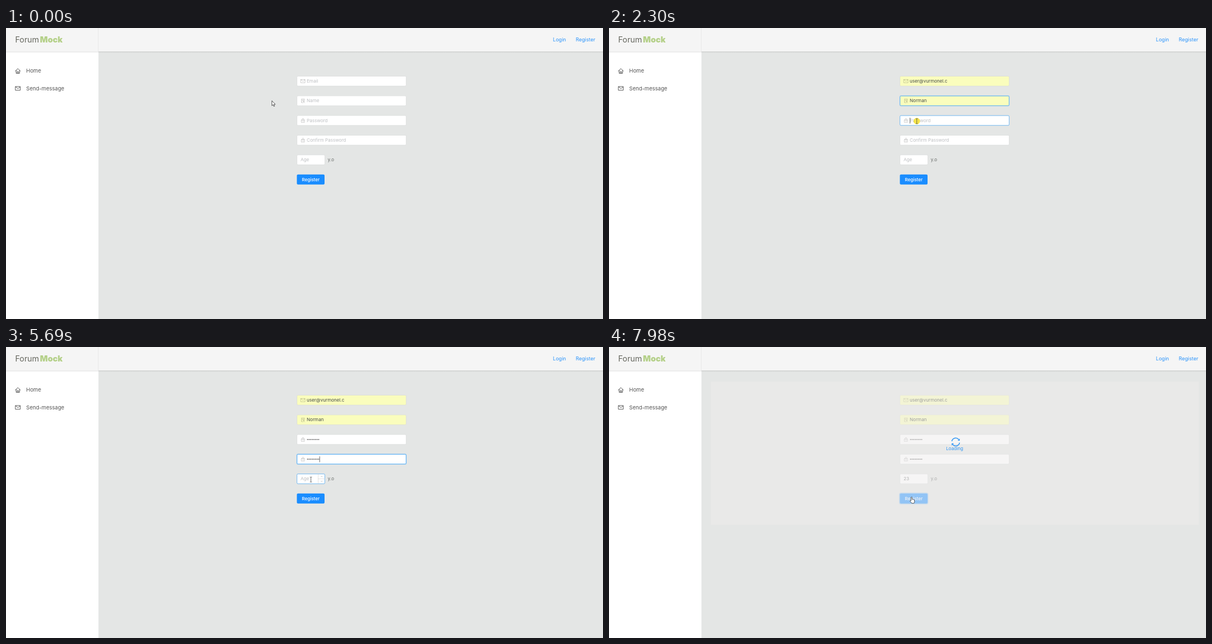
These frames come from a looping animation (1072x522 px, 8000 ms). An HTML page:

```html
<!DOCTYPE html>
<html lang="en">
<head>
<meta charset="utf-8">
<title>Registration form</title>
<style>
  html, body { margin: 0; width: 100%; height: 100%; overflow: hidden; background: #e4e6e5; }
  svg { display: block; width: 1072px; height: 522px; font: 8.1px Inter, "Open Sans", sans-serif; }
  .line { fill: none; stroke-width: .7; stroke-linejoin: round; stroke-linecap: round; }
  .muted { stroke: rgba(0,0,0,.27); }
  .dark { stroke: #4a4a4a; stroke-width: .9; }
  .hint { fill: #bdbfc2; }
  .value { fill: #454a48; }
  .typed { fill: #707372; }
  .nav { font-size: 9.55px; fill: #555; }
  .link { font-size: 9.1px; fill: #2f96fb; }
</style>
</head>
<body>
<svg id="stage" viewBox="0 0 1072 522" xmlns="http://www.w3.org/2000/svg">
  <defs>
    <linearGradient id="shade" x2="0" y2="1">
      <stop stop-color="#000" stop-opacity=".1"/>
      <stop offset="1" stop-color="#000" stop-opacity="0"/>
    </linearGradient>
  </defs>
  <rect width="1072" height="522" fill="#e4e6e5"/>
  <rect width="166" height="522" fill="#fff"/>
  <rect width="1072" height="42" fill="#f5f5f5"/>
  <rect y="42" width="166" height="3" fill="url(#shade)"/>
  <rect x="166" y="42" width="906" height="3" fill="url(#shade)"/>
  <rect x="165.4" width=".7" height="42" fill="#e2e3e3"/>
  <text x="16.5" y="25.8" font-size="14.3" fill="#66675f">Forum</text>
  <text x="61" y="25.8" font-size="14.6" font-weight="900" fill="#b4d088">Mock</text>
  <text class="link" x="982" y="24.3">Login</text>
  <text class="link" x="1023" y="24.3">Register</text>
  <path class="line dark" d="M16.8 77.3 21.3 72.8 25.8 77.3M18.2 76V81.3H24.4V76M20.2 81.3V78.2H22.4V81.3"/>
  <text class="nav" x="36.3" y="80.4">Home</text>
  <path class="line dark" d="M17.2 105H25.6V111.7H17.2ZM17.4 105.6 21.4 108.8 25.4 105.6"/>
  <text class="nav" x="36.3" y="111.8">Send-message</text>
  <g id="form"></g>
  <g id="mask">
    <rect x="183" y="62" width="876" height="257" fill="#eeecec" opacity=".52"/>
  </g>
  <g id="loading">
    <g id="spin">
      <path d="M-7 -1.2A7.1 7.1 0 0 1 5.3 -4.7M7 1.2A7.1 7.1 0 0 1 -5.3 4.7" fill="none" stroke="#2f96f5" stroke-width="1.5"/>
      <path d="M7.2 -6.3V-2.4H3.3ZM-7.2 6.3V2.4H-3.3Z" fill="#2f96f5"/>
    </g>
    <text x="620.6" y="185.2" text-anchor="middle" fill="#2f96f5">Loading</text>
  </g>
  <circle id="click" r="5.8" fill="#f4e22e"/>
  <g id="cursor">
    <path id="arrow" d="M.5 .5V9.3L2.5 7.5 4 10.7 5.3 10.1 3.9 7H6.6Z" fill="#fff" stroke="#333" stroke-width=".8"/>
    <path id="beam" d="M-1.8 -4.4H-.5L0 -4 .5 -4.4H1.8M0 -4V4.2M-1.8 4.6H-.5L0 4.2 .5 4.6H1.8" fill="none" stroke="#444" stroke-width=".75"/>
    <path id="hand" d="M-1 5.5V-.7Q0 -1.9 1 -.7V3Q2 2.3 2.7 3.3 3.7 2.7 4.2 3.7 5.2 3.3 5.3 4.5V7.3Q5 9 4.2 10H.4Q-.6 8.5 -2.9 6Q-2.6 4.4 -1 5.5Z" fill="#fff" stroke="#333" stroke-width=".8"/>
  </g>
</svg>
<script>
const LOOP = 8000, LEFT = 522.5, TOP = 95.3, STEP = 35.3, HEIGHT = 17.6;
const BLUE = '#4aabfa', RED = '#f0424d', DOT = 2.85;
const $ = id => document.getElementById(id);

function add(parent, tag, attrs, text) {
  const node = document.createElementNS('http://www.w3.org/2000/svg', tag);
  for (const key in attrs) node.setAttribute(key, attrs[key]);
  if (text) node.textContent = text;
  return parent.appendChild(node);
}
const set = (node, key, value) => node.setAttribute(key, value);
const fade = (node, opacity) => set(node, 'opacity', opacity);
const ramp = (t, from, to) => Math.min(1, Math.max(0, (t - from) / (to - from)));
const pulse = (t, from, to) => ramp(t, from, from + 180) * (1 - ramp(t, to, to + 200));
const countPast = (t, times) => times.filter(time => time <= t).length;

const lock = 'M530.6 -.7H536V3.3H530.6ZM531.7 -.7V-1.8A1.6 1.7 0 0 1 534.9 -1.8V-.7M533.3 .9V1.7';
const fields = [
  { hint: 'Email', value: 'user@vurmonel.c', focus: [340, 1340], keys: [900],
    icon: 'M529.6 -2.9H537V2.9H529.6ZM529.8 -2.4 533.3 .5 536.8 -2.4' },
  { hint: 'Name', value: 'Norman', focus: [1340, 2280], keys: [1900],
    icon: 'M536 -.5V-3.2H530.5V3.3H533M532 -1.4H534.6M532 .2H533.4M533.6 3.4Q534.9 1 536.3 3.4M534.1 .9A.8 .8 0 1 1 535.7 .9A.8 .8 0 1 1 534.1 .9' },
  { hint: 'Password', secret: true, focus: [2280, 3400], icon: lock,
    keys: [2650, 2850, 2930, 3000, 3060, 3120, 3180, 3240] },
  { hint: 'Confirm Password', secret: true, focus: [3400, 5770], icon: lock, error: [3660, 5250],
    keys: [3660, 3800, 3940, 4170, 4440, 4620, 4920, 5250] },
  { hint: 'Age', value: '23', typed: true, focus: [5770, 7620], keys: [6970, 7130], width: 50 }
];

// Time, x, y of the pointer; moves between entries are eased.
const path = [
  [0, 477, 130], [90, 477, 130], [290, 545, 96], [840, 545, 96], [990, 547, 162],
  [1060, 547, 162], [1320, 547, 132], [1820, 547, 132], [1960, 548, 148], [2220, 552.7, 167],
  [3050, 552.7, 167], [3270, 559.5, 190], [3390, 562.8, 200], [5300, 562.8, 200],
  [5740, 547, 239], [6070, 547, 239], [6190, 544, 245.2], [6400, 546, 243],
  [7180, 546, 243], [7520, 543.3, 270.3], [LOOP, 543.3, 270.3]
];
const clicks = [340, 1340, 2280, 3400, 5770, 6270, 7620];

const form = $('form');
fields.forEach((field, i) => {
  const y = TOP + STEP * i;
  field.y = y;
  field.width = field.width || 196;
  const g = add(form, 'g', { transform: `translate(0 ${y})` });
  const box = { x: LEFT, y: -HEIGHT / 2, width: field.width, height: HEIGHT, rx: 1.8 };
  const outline = color => {
    const ring = add(g, 'g', { opacity: 0 });
    add(ring, 'rect', { ...box, fill: 'none', stroke: color, 'stroke-width': 2.2, 'stroke-opacity': .22 });
    add(ring, 'rect', { ...box, fill: 'none', stroke: color, 'stroke-width': .8 });
    return ring;
  };
  field.box = add(g, 'rect', { ...box, fill: '#fff', stroke: '#d6d7d7', 'stroke-width': .6 });
  field.hover = add(g, 'rect', { ...box, fill: 'none', stroke: BLUE, 'stroke-width': .7 });
  field.ring = outline(BLUE);
  if (field.error) field.alarm = outline(RED);
  if (field.icon) add(g, 'path', { class: 'line muted', d: field.icon });
  field.x = field.icon ? 540 : 529;
  field.label = add(g, 'text', { class: 'hint', x: field.x, y: 2.6 }, field.hint);
  if (field.secret) {
    field.dots = field.keys.map((_, n) =>
      add(g, 'circle', { cx: field.x + 1.5 + DOT * n, cy: 0, r: .95, fill: '#555' }));
  } else {
    field.text = add(g, 'text', { class: field.typed ? 'typed' : 'value', x: field.x, y: 2.6 }, field.value);
  }
  field.caret = add(g, 'rect', { y: -5, width: .8, height: 10.5, fill: '#444' });
});

const age = fields[4];
const arrows = add(form, 'g', { transform: `translate(560.6 ${age.y})` });
add(arrows, 'path', { class: 'line', stroke: '#d9d9d9', d: 'M0 -8.3V8.3M0 0H11.8' });
add(arrows, 'path', { class: 'line', stroke: '#aaa', d: 'M5 -3.6 6.2 -4.8 7.4 -3.6M5 3.8 6.2 5 7.4 3.8' });
add(form, 'text', { x: 577.7, y: age.y + 2.6, fill: '#676a68' }, 'y.o');

const button = { x: 522.3, y: 262.7, width: 49.7, height: 18, rx: 2 };
const wave = add(form, 'rect', { ...button, fill: 'none', stroke: '#1890ff', 'stroke-width': 3, 'stroke-opacity': .5 });
const face = add(form, 'rect', { ...button, fill: '#1a8dff' });
add(form, 'text', { x: 547.2, y: 274.6, 'text-anchor': 'middle', 'font-weight': 500, fill: '#fff' }, 'Register');
const invalid = add(form, 'text', { x: 522.3, y: 113 }, 'invalid email');
const mismatch = add(form, 'text', { x: 522.3, y: 219.2, 'font-size': 8.3, fill: RED }, 'Two passwords not match!');

function pointerAt(t) {
  const i = path.findIndex(point => point[0] > t);
  const [t0, x0, y0] = path[i - 1], [t1, x1, y1] = path[i];
  const p = ramp(t, t0, t1), eased = p * p * (3 - 2 * p);
  return { x: x0 + (x1 - x0) * eased, y: y0 + (y1 - y0) * eased };
}

const inside = (p, y, width) =>
  p.x >= LEFT && p.x <= LEFT + width && Math.abs(p.y - y) <= HEIGHT / 2;

function drawField(field, t, pointer) {
  const count = countPast(t, field.keys);
  const [start, end] = field.focus;
  const over = inside(pointer, field.y, field.width);
  const wrong = field.error ? pulse(t, ...field.error) : 0;
  const focus = pulse(t, start, end) * (1 - wrong);
  fade(field.hover, over ? (1 - wrong) * (1 - focus) : 0);
  fade(field.ring, focus);
  if (field.alarm) fade(field.alarm, wrong);
  fade(field.label, count ? 0 : 1);

  let caretX = field.x;
  if (field.secret) {
    field.dots.forEach((dot, n) => fade(dot, n < count ? 1 : 0));
    caretX += DOT * count;
  } else {
    field.text.textContent = field.typed ? field.value.slice(0, count) : count ? field.value : '';
    if (count) caretX += field.text.getComputedTextLength();
    if (!field.typed) set(field.box, 'fill', count ? '#fafdbd' : '#fff');
  }
  const last = Math.max(start, ...[...field.keys, ...clicks].filter(time => time <= t));
  const shown = t >= start && t < end && Math.floor((t - last) / 500) % 2 === 0;
  set(field.caret, 'x', caretX);
  fade(field.caret, shown ? 1 : 0);
  return over;
}

function draw(t) {
  const pointer = pointerAt(t);
  const overField = fields.map(field => drawField(field, t, pointer)).some(Boolean);
  const overButton = inside(pointer, 271.9, button.width);

  fade(arrows, inside(pointer, age.y, age.width) ? 1 : 0);
  fade(invalid, ramp(t, 890, 920) * (1 - ramp(t, 980, 1200)));
  set(invalid, 'fill', t < 970 ? RED : '#9c9e9d');
  fade(mismatch, pulse(t, ...fields[3].error));
  set(face, 'fill', overButton ? '#2f9aff' : '#1a8dff');
  fade(wave, .6 * ramp(t, 7620, 7700));

  fade($('mask'), ramp(t, 7680, 7900));
  fade($('loading'), ramp(t, 7700, 7860));
  set($('spin'), 'transform', `translate(622.6 170.4) rotate(${(t - 7980) * .36})`);

  const lastClick = Math.max(-LOOP, ...clicks.filter(time => time <= t));
  set($('click'), 'cx', pointer.x);
  set($('click'), 'cy', pointer.y);
  fade($('click'), .85 * (1 - ramp(t, lastClick + 60, lastClick + 120)));

  set($('cursor'), 'transform', `translate(${pointer.x} ${pointer.y})`);
  const kind = overButton ? 'hand' : overField ? 'beam' : 'arrow';
  for (const id of ['arrow', 'beam', 'hand']) fade($(id), id === kind ? 1 : 0);
}

const begin = performance.now();
function tick() {
  draw((performance.now() - begin) % LOOP);
  requestAnimationFrame(tick);
}
tick();
</script>
</body>
</html>
```
